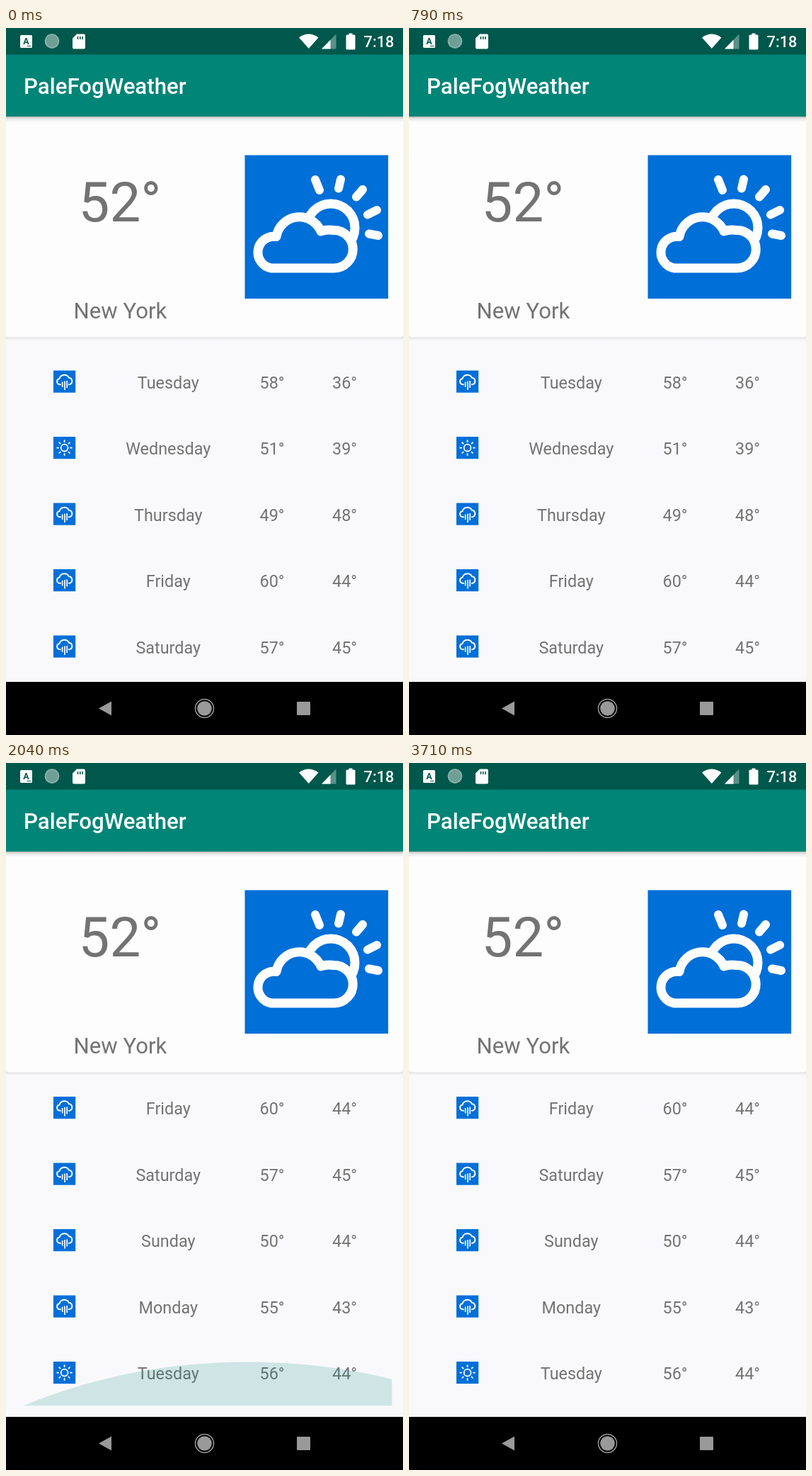
An HTML page that plays this animation: 561x998 px, repeating every 3750 ms.

```html
<!DOCTYPE html>
<html lang="en">
<head>
<meta charset="utf-8">
<title>Weather forecast</title>
<style>
  html, body { margin: 0; width: 100%; height: 100%; overflow: hidden; background: #f9f9fb; }
  svg { display: block; width: 100vw; height: 100vh; font-family: Roboto, sans-serif; }
  .mid { text-anchor: middle; fill: #737373; }
  .line { fill: none; stroke: #fdfdfd; }
</style>
</head>
<body>
<svg viewBox="0 0 561 998" xmlns="http://www.w3.org/2000/svg">
  <defs>
    <clipPath id="listClip"><rect x="16" y="452.4" width="529.5" height="455.1"/></clipPath>
    <linearGradient id="shade" x2="0" y2="1">
      <stop offset="0" stop-color="#000" stop-opacity=".27"/>
      <stop offset=".4" stop-color="#000" stop-opacity=".08"/>
      <stop offset="1" stop-color="#000" stop-opacity="0"/>
    </linearGradient>
    <g id="rain">
      <rect width="31.2" height="31.2" fill="#006fd8"/>
      <path class="line" stroke-width="2" stroke-linecap="round" d="M10 19.7H9a4.2 4.2 0 0 1-.5-8.3A7.3 7.3 0 0 1 22 10.300a4.800 4.800 0 0 1 .8 9.400h-1"/>
      <path class="line" stroke-width="1.7" d="M12.700 16v7.500M16 15v12.500M19.200 14.500v10"/>
    </g>
    <g id="sun">
      <rect width="31.2" height="31.2" fill="#006fd8"/>
      <circle class="line" cx="15.600" cy="15.600" r="4.900" stroke-width="1.800"/>
      <g id="rays" class="line" stroke-width="1.800" stroke-linecap="round"/>
    </g>
  </defs>

  <rect width="561" height="998" fill="#f9f9fb"/>

  <!-- current weather -->
  <rect x="0" y="434" width="561" height="7" fill="url(#shade)"/>
  <path d="M0 125H561V433.500a3 3 0 0 1-3 3H3a3 3 0 0 1-3-3Z" fill="#fdfdfd"/>
  <text class="mid" x="161" y="273" font-size="78">52°</text>
  <text class="mid" x="161.500" y="409.500" font-size="31.200">New York</text>
  <rect x="337.500" y="179.500" width="202.600" height="202.500" fill="#006fd8"/>
  <circle class="line" cx="459" cy="282" r="34" stroke-width="13"/>
  <path d="M375 339A22.500 22.500 0 0 1 382 294.500A33 33 0 0 1 445.500 286.500Q454 285 463 285.500A26.700 26.700 0 0 1 464 339Z" fill="#006fd8"/>
  <path class="line" stroke-width="13" stroke-linejoin="round" d="M375 339A22.500 22.500 0 0 1 382 294.500A33 33 0 0 1 445 287Q453 284 463 285.500A26.700 26.700 0 0 1 464 339Z"/>
  <path class="line" stroke-width="12" stroke-linecap="round" d="M437 214l6 15M473 213.500l-3 13M504 228l-9 10.500M524 257l-13 6.500M513 290.500l13 2.500"/>

  <!-- forecast list -->
  <g clip-path="url(#listClip)">
    <g id="list"></g>
    <g id="glow" fill="#008577"><path d="M-317.500 0A635 635 0 0 1 317.500 0Z"/></g>
  </g>

  <!-- app bar -->
  <rect y="125" width="561" height="8" fill="url(#shade)"/>
  <rect width="561" height="125" fill="#008577"/>
  <text x="25" y="93" font-size="31.200" font-weight="500" fill="#fff">PaleFogWeather</text>

  <!-- status bar -->
  <rect width="561" height="37.500" fill="#00574b"/>
  <rect x="20" y="10" width="17" height="18" rx="1.500" fill="#fff"/>
  <text x="28.500" y="22.500" font-size="12.500" font-weight="700" text-anchor="middle" fill="#00574b">A</text>
  <path d="M30 25.500h5" stroke="#00574b" stroke-width="1.500" stroke-dasharray="1.500 .5"/>
  <circle cx="65" cy="18.500" r="9.500" fill="#6f9f97" stroke="#a9c7c2" stroke-width="1.800" stroke-dasharray="1.500 .7"/>
  <path d="M100 8.500H110a2 2 0 0 1 2 2V27.500a2 2 0 0 1-2 2H96a2 2 0 0 1-2-2V14.500Z" fill="#fff"/>
  <path d="M101.500 12v4M104.800 12v4M108 12v4" stroke="#00574b" stroke-width="1.600"/>
  <path d="M414 13.500Q427.500 3.500 441.500 13.500L427.800 29Z" fill="#fff"/>
  <path d="M466.500 8.500V29.500H446Z" fill="#fff" opacity=".35"/>
  <path d="M458.500 16.700V29.500H446Z" fill="#fff"/>
  <path d="M484.500 9.500V7.500h5v2H492a1.500 1.500 0 0 1 1.500 1.500V29a1.500 1.500 0 0 1-1.500 1.500H482a1.500 1.500 0 0 1-1.500-1.500V11a1.500 1.500 0 0 1 1.500-1.500Z" fill="#fff"/>
  <text x="527" y="27" font-size="21.800" font-weight="500" text-anchor="middle" fill="#fff">7:18</text>

  <!-- navigation bar -->
  <rect y="923" width="561" height="75" fill="#000"/>
  <g fill="#999">
    <path d="M131 960.500L149 950.500V970.500Z"/>
    <circle cx="280.500" cy="960.500" r="10.300"/>
    <circle cx="280.500" cy="960.500" r="13" fill="none" stroke="#999" stroke-width="1.500"/>
    <rect x="411" y="951" width="19" height="19" rx="1"/>
  </g>
</svg>
<script>
const LOOP = 3750;
const ROW = 93.5;
const MAX_SCROLL = 293;
const PEAK = 0.73;

const days = [
  ["rain", "Tuesday", 58, 36],
  ["sun", "Wednesday", 51, 39],
  ["rain", "Thursday", 49, 48],
  ["rain", "Friday", 60, 44],
  ["rain", "Saturday", 57, 45],
  ["rain", "Sunday", 50, 44],
  ["rain", "Monday", 55, 43],
  ["sun", "Tuesday", 56, 44]
];

const byId = id => document.getElementById(id);
const list = byId("list");
const glow = byId("glow");

byId("rays").innerHTML = Array.from({ length: 8 }, (_, i) =>
  `<path d="M15.6 7.2V5.2" transform="rotate(${i * 45} 15.6 15.6)"/>`).join("");

const cell = (x, y, text) =>
  `<text class="mid" x="${x}" y="${y}" font-size="23.4">${text}</text>`;

list.innerHTML = days.map(([icon, name, high, low], i) => {
  const y = 508.5 + i * ROW;
  return `<use href="#${icon}" x="67" y="${y - 25}"/>` +
    cell(229.3, y, name) + cell(376, y, high + "°") + cell(478.5, y, low + "°");
}).join("");

const progress = (t, from, to) => Math.min(1, Math.max(0, (t - from) / (to - from)));
const smooth = p => p * p * (3 - 2 * p);

function draw(t) {
  const scroll = MAX_SCROLL * smooth(progress(t, 1450, 1900));
  list.setAttribute("transform", `translate(0 ${-scroll})`);

  // Overscroll glow: pulled up by the drag, then recedes on release.
  const pull = 1 - (1 - progress(t, 1870, 2030)) ** 2;
  const recede = (1 - progress(t, 2700, 3300)) ** 2;
  const level = pull * recede;
  const s = PEAK * level;
  glow.setAttribute("transform", `translate(341.5 907.5) scale(1 ${s}) translate(0 0)`);
  glow.setAttribute("opacity", 0.17 * level);
  glow.setAttribute("visibility", level > 0.01 ? "visible" : "hidden");
}

const start = performance.now();
function tick() {
  draw((performance.now() - start) % LOOP);
  requestAnimationFrame(tick);
}
tick();
</script>
</body>
</html>
```
